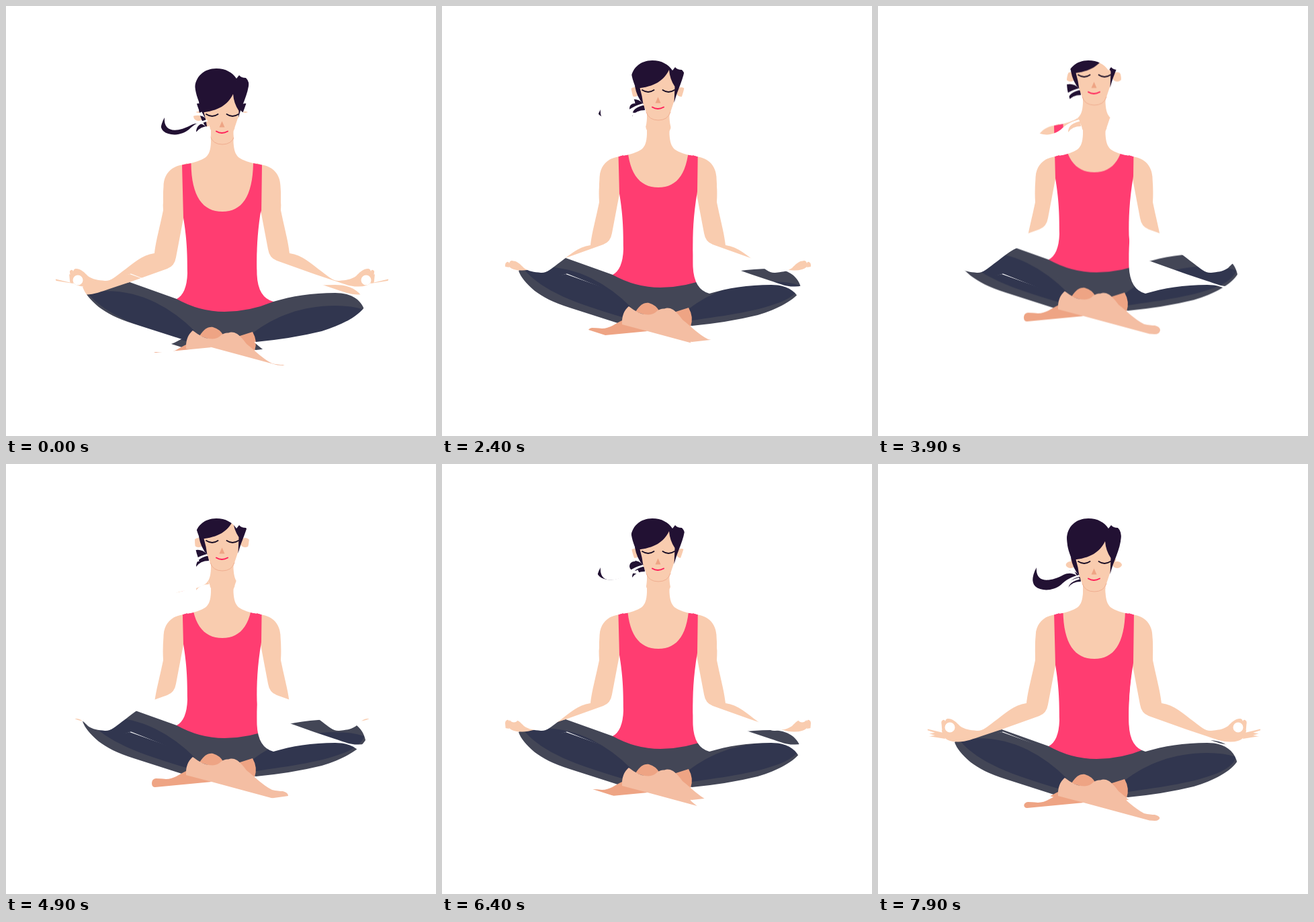
Animation of 640 by 640 pixels, one loop 8 s. Source, as an HTML page:

```html
<!DOCTYPE html>
<html lang="en">
<head>
<meta charset="utf-8">
<title>Floating meditation</title>
<style>
  html, body { margin: 0; width: 100%; height: 100%; overflow: hidden; background: #fff; }
  svg { display: block; width: 100vw; height: 100vh; }

  .skin { fill: #f9ccaf; }
  .foot { fill: #f4bea3; }
  .shade { fill: #eea484; }
  .top { fill: #ff3d71; }
  .leg { fill: #434656; }
  .fold { fill: #31364f; }
  .hair { fill: #221133; }
  .line { fill: none; stroke-linecap: round; }

  #window { mask-type: alpha; }

  /* Rises steadily, then sinks more slowly, ten poses a second. */
  .float { animation: float 8s infinite; }
  @keyframes float {
    0%     { transform: translateY(0);       animation-timing-function: steps(39); }
    48.75% { transform: translateY(-58.5px); animation-timing-function: steps(10); }
    61.25% { transform: translateY(-47px);   animation-timing-function: steps(15); }
    80%    { transform: translateY(-31px);   animation-timing-function: steps(16); }
    100%   { transform: translateY(-15px); }
  }
</style>
</head>
<body>
<svg viewBox="0 0 640 640">
  <defs>
    <g id="arm" class="skin">
      <path fill-rule="evenodd" d="M270 234 L262 236.500 C246 239 235 250 234.500 268
        Q233 288 234 304 C228 333 223 350 221 368 C201 371 190 383 172 396
        C163 403 155 410 147 409 C137 408 129 407 122 402 C117 397 112 391 104 391
        Q101 391 100 395 Q99 392 97 393 Q94 394 94 398 L95 409 L97 420
        Q100 426 107 428 Q112 429.500 118 429.500 C130 430 142 425 154 421 L184 411 L240 391
        Q251 387 253 374 L264 316 L270 300 Z
        M99.500 408 a7.500 7.500 0 1 0 15 0 a7.500 7.500 0 1 0 -15 0 Z"/>
      <path d="M97 412 L74 406.500 L73 412 L97 420 Z"/>
      <path d="M97 414 L75 417.500 Q72 419 75 421 L100 425 Z"/>
    </g>

    <g id="woman">
      <path class="hair" d="M299 181 C293 174 284 173 276 177 C254 189 234 188 236 166
        C229 178 228 192 234 198 C243 206 261 205 272 196 C280 188 288 184 299 181 Z"/>
      <path class="hair" d="M301 183.500 C290 186 283 190 283 200 Q289 191 302 191 Z"/>

      <path class="leg" d="M184 411 L254 436 L325 440 L398 440 C425 432 455 427 490 427
        C515 427 531 438 535 458 C526 473 500 487 470 496 Q425 507 372 512
        L320 500 L268 510 L190 485 C165 477 150 469 138 460 Q118 443 114 430 L118 427 Z"/>
      <path class="fold" d="M122 428 C150 420 190 425 222 441 Q254 457 280 483 L268 499
        C200 479 150 461 122 428 Z"/>
      <path class="fold" d="M367 487 C400 462 440 446 490 446 Q516 446 533 452
        Q530 464 510 474 C475 490 420 497 372 504 Z"/>

      <path class="shade" d="M268 504 C257 509 250 516 238 516 Q228 515 223 515
        Q217 516 217 522 Q217 528 222 528 L306 520 Z"/>
      <path class="shade" d="M288 491 C296 478 304 477 308 478 Q319 481 324 491 L313 499 Z"/>
      <path class="shade" d="M345 492 L367 485 Q375 499 370 513 L356 505 Z"/>
      <path class="foot" d="M268 510 Q267 492 278 483 Q292 494 302 495 Q314 497 320 490
        Q325 486 331 486.500 Q337 484 344 488 Q350 492 358 503 C372 514 381 524 396 532
        Q406 534 412 534 Q420 536 420 541 Q419 547 412 547 L404 546.500
        L306 520 Z"/>

      <use href="#arm"/>
      <use href="#arm" transform="matrix(-1 0 0 1 643 0)"/>
      <path class="skin" d="M305 185 L305 203 C304 226 296 228 275 234 L264 236 L268 320
        L375 320 L379 236 L368 234 C347 228 340 226 338.500 203 L338.500 185 Z"/>

      <path class="top" d="M262 236.500 L275.500 234 C276 284 293 306 322 306
        C351 306 367 284 368 234 L381 236.500 L380 312 C374 348 373 375 373.500 400
        Q375 434 398 440 Q362 455 325 455 Q288 455 254 436 Q269 428 270 398
        C270 365 269 346 264 315 Z"/>

      <ellipse class="skin" cx="286.500" cy="164" rx="7.500" ry="7"/>
      <ellipse class="skin" cx="356" cy="164" rx="7.500" ry="7"/>
      <path class="skin" d="M290 140 L298 178 L304 194 Q308 206 322 206
        Q336 206 340 194 L346 176 L352 130 L330 115 Z"/>
      <path class="line" stroke="#f0ae90" d="M304 194 Q308 206 322 206 Q336 206 340 194"/>

      <path class="hair" d="M287 155 L294 156 Q298 170 299.500 182 Q290 172 287 155 Z"/>
      <path class="hair" d="M289 159 C283 145 281 136 281 124 C281 105 295 93 313 93
        C327 93 337 99 343 108 L347 103 Q350 107 357 107 Q362.500 112 362 124
        C360 146 351 158 345.500 180 L346.500 156 Q339 145 338 131 C330 147 317 156 289 159 Z"/>

      <g class="line" stroke="#180d24" stroke-width="1.800">
        <path d="M298 161 Q307 167 315.500 161"/>
        <path d="M328.500 161 Q337 167 346 161"/>
      </g>
      <path class="shade" d="M321.500 171.500 L317.500 180.500 H325.500 Z"/>
      <path class="line" stroke="#ff1f58" stroke-width="2" d="M313 186.500 Q321 191.500 330 186.500"/>
    </g>

    <!-- The figure only shows inside its own resting outline, closed gaps filled. -->
    <mask id="window" maskUnits="userSpaceOnUse" x="0" y="0" width="640" height="640">
      <g transform="translate(0 -12)">
        <use href="#woman"/>
        <circle cx="107" cy="408" r="8"/>
        <circle cx="536" cy="408" r="8"/>
        <path d="M180 408 L235 385 L248 370 L260 312 L275 316 V398 L260 440 Z"/>
      </g>
    </mask>
  </defs>

  <g mask="url(#window)">
    <g class="float"><use href="#woman"/></g>
  </g>
</svg>
</body>
</html>
```
